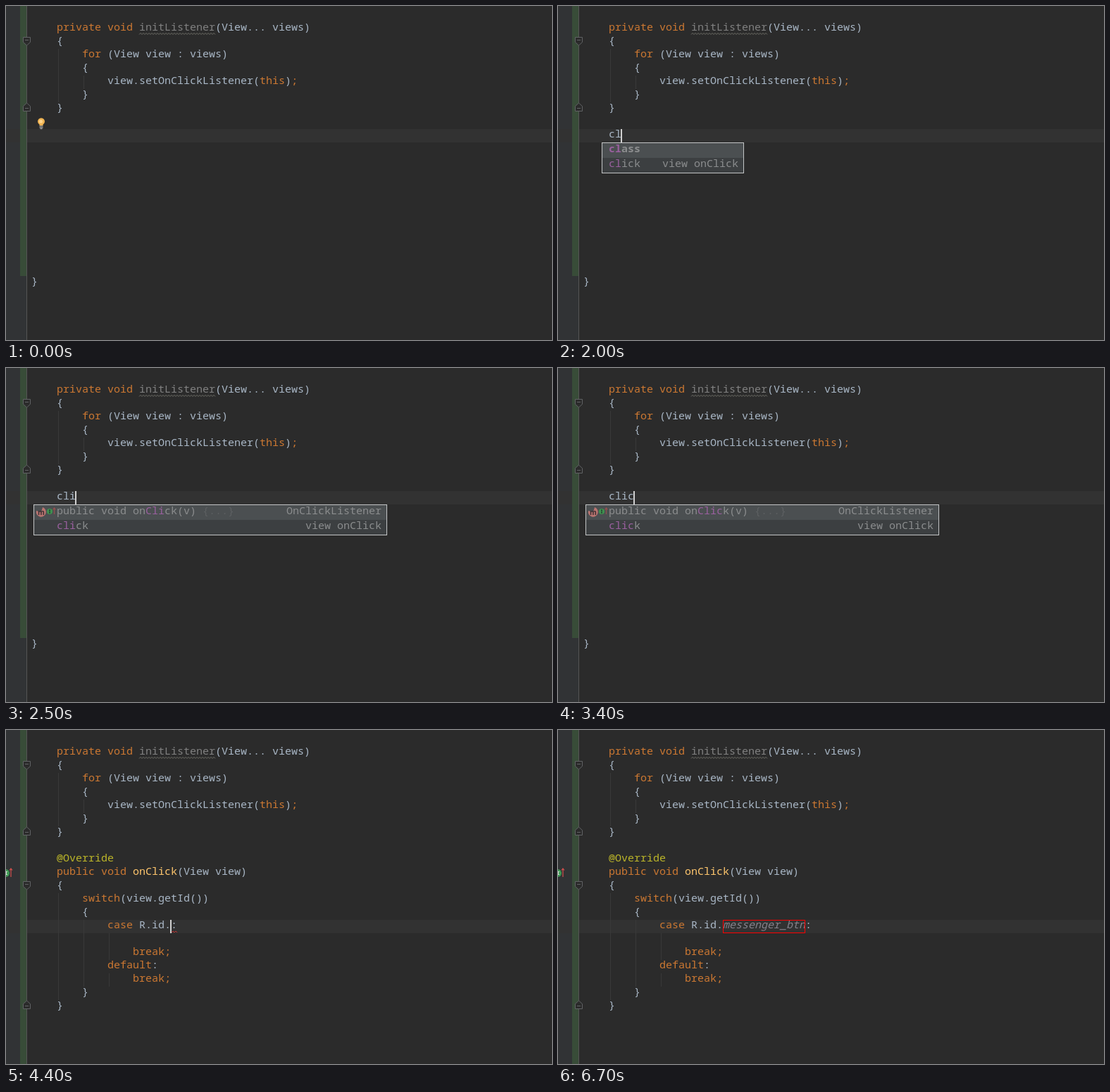
Animation of 775 by 475 pixels, one loop 6.8 s. Source, as an HTML page:

```html
<!DOCTYPE html>
<html lang="en">
<head>
<meta charset="utf-8">
<title>Live template in a code editor</title>
<style>
html, body { margin: 0; width: 100%; height: 100%; overflow: hidden; background: #2b2b2b; }
svg { display: block; }
text { font: 15px "Noto Sans Mono", "Liberation Mono", monospace; white-space: pre; fill: #a9b7c6; }
.key { fill: #cc7832; }
.note { fill: #bbb529; }
.name { fill: #ffc66d; }
.grey { fill: #808080; }
.bold { font-weight: bold; }
.field { fill: #85818a; font-style: italic; }
.guide { stroke: #393939; }
.fold { fill: #2b2b2b; stroke: #606264; }
.dim text { fill: #8b8d8e; }
.dim .hit { fill: #9a609f; }
.dim .tail { fill: #5d6062; }
.lit text { fill: #bbbbbb; }
.lit .hit { fill: #d583e3; }
.lit .tail { fill: #707375; }
.lit .icon, .dim .icon { font: bold 10px "Noto Sans", sans-serif; fill: #3c3033; text-anchor: middle; }
</style>
</head>
<body>
<svg id="stage" width="775" height="475" viewBox="0 0 775 475"></svg>
<script>
const LOOP = 6800, CHAR = 9, LINE = 19, ROW = 21;
const stage = document.getElementById("stage");

const lineTop = n => 23 + LINE * n;
const span = (cls, s) => `<tspan class="${cls}">${s}</tspan>`;
const key = s => span("key", s);
const rect = (x, y, w, h, fill, more = "") =>
  `<rect x="${x}" y="${y}" width="${w}" height="${h}" fill="${fill}" ${more}/>`;
const frame = (x, y, w, h, color) =>
  rect(x + .5, y + .5, w - 1, h - 1, "none", `stroke="${color}"`);
const path = (d, attrs) => `<path d="${d}" ${attrs}/>`;
const text = (x, y, s, attrs = "") => `<text x="${x}" y="${y}" ${attrs}>${s}</text>`;
const code = (line, column, s) => text(36 + CHAR * column, lineTop(line) + 12, s);

const wave = (x, y, width, color) => {
  let d = `M${x} ${y + 2}`;
  for (let i = 2; i <= width; i += 2) d += `L${x + i} ${y + (i % 4 ? 0 : 2)}`;
  return path(d, `fill="none" stroke="${color}" stroke-width=".9"`);
};

const guide = (x, from, to) =>
  path(`M${x + .5} ${lineTop(from)}V${lineTop(to)}`, 'class="guide"');

// A pentagon that points into the folded block
const fold = (line, dir) => {
  const y = lineTop(line) + 7.5;
  const start = dir > 0 ? y - 5 : y + 5;
  return path(`M24.5 ${start}h10v${7 * dir}l-5 ${4.5 * dir}l-5 ${-4.5 * dir}z` +
    `M27 ${y - (dir > 0 ? 1 : -1)}h5`, 'class="fold"');
};

const bulb = ([x, y]) => `<g transform="translate(${x} ${y})">
  <path d="M2.5 10V8.5A5 5 0 1 1 7.5 8.5V10z" fill="#f0b453"/>
  <circle cx="4.5" cy="4.2" r="2.5" fill="#ffd58c"/>
  <path d="M2.5 11h5M2.5 13h5M3.5 14.5h3" stroke="#8e8e8e" stroke-width="1.4"/></g>`;

const arrow = (x, y, h, color) =>
  path(`M${x} ${y + h}V${y}M${x - 2} ${y + 2.5}L${x} ${y}L${x + 2} ${y + 2.5}`,
    `fill="none" stroke="${color}" stroke-width="1.2"`);

// Icons: "o" overrides, "i" implements, "f" field
function icon(kind, y, lit) {
  const body = lit ? "#e08078" : "#b87470";
  if (kind === "f") {
    return `<circle cx="12" cy="${y}" r="7" fill="#b98a4a"/>` +
      text(12, y + 4, "f", 'class="icon"');
  }
  const shape = kind === "o"
    ? `<circle cx="11" cy="${y}" r="7" fill="${body}"/>`
    : path(`M4 ${y - 2}L11 ${y}L13 ${y - 7}A7 7 0 1 1 4 ${y - 2}z`, `fill="${body}"`);
  const badge = kind === "o" ? "#4589a6" : "#3f9150";
  return shape + text(11, y + 3.5, "m", 'class="icon"') +
    `<circle cx="23" cy="${y - 1}" r="4" fill="${badge}"/>` +
    (kind === "o"
      ? `<circle cx="23" cy="${y - 1}" r="1.6" fill="none" stroke="#2d3438"/>`
      : path(`M23 ${y - 3}v4M22 ${y - 3}h2M22 ${y + 1}h2`, 'stroke="#25352a" fill="none"')) +
    arrow(29.5, y - 6, 9, lit ? "#c75450" : "#98504e");
}

const markup = s => s
  .replace(/\[(.+?)\]/, (_, hit) => span("hit", hit))
  .replace(/\{.*$/, tail => span("tail", tail));

function popup({ x, y = 194, w, h, textX = 72, rows, selected = 0, lit, scroll }) {
  const inner = w - (scroll ? 15 : 2);
  const right = w - (scroll ? 22 : 8);
  let out = rect(0, 0, w, h, "#3c3f41") +
    rect(1, 1 + ROW * selected, inner, ROW, lit ? "#0052a4" : "#4b4f51");
  rows.forEach(([kind, label, origin, cls = ""], i) => {
    const base = 14 + ROW * i;
    if (kind) out += icon(kind, base - 3, lit);
    out += text(textX - x, base, markup(label), `class="${cls}"`);
    if (origin) out += text(right - CHAR * origin.length, base, origin);
  });
  if (scroll) {
    out += rect(w - 14, 1, 13, h - 2, "#3c3f41") + rect(w - 11, 1, 10, 183, "#595b5d") +
      text(w - 12, h - 3, "π", 'style="fill:#3d94c4"');
  }
  return `<svg class="${lit ? "lit" : "dim"}" x="${x}" y="${y}" width="${w}" height="${h}">` +
    out + frame(0, 0, w, h, "#c3c5c6") + "</svg>";
}

const click = hit => ["", `[${hit}]` + "click".slice(hit.length), "view onClick"];
const onClick = hit =>
  ["i", `public void on[${hit}]${"Click".slice(hit.length)}(v) {...}`, "OnClickListener"];
const classRow = ["", "[cl]ass", "", "bold"];
const wide = { x: 39, w: 502 };
const pair = hit => ({
  ...wide, h: 44, rows: [onClick("C" + hit.slice(1)), click(hit)]
});
const shortList = { x: 62, w: 202, h: 44, rows: [classRow, click("cl")] };
const fullList = {
  ...wide, h: 223, scroll: true,
  rows: [
    classRow,
    click("cl"),
    ["o", "protected Object [cl]one() {...}", "Object"],
    ["o", "public void [cl]oseContextMenu() {...}", "Activity"],
    ["o", "public void [cl]oseOptionsMenu() {...}", "Activity"],
    ["o", "public void [cl]earWallpaper() {...}", "ContextWrapper"],
    ["o", "public [Cl]assLoader getClassLoader…", "ContextWrapper"],
    ["o", "public String getLocal[Cl]assName() {...}", "Activity"],
    onClick("Cl"),
    ["o", "public void onContextMenu[Cl]osed(menu) {…", "Activity"],
    ["o", "public void onOptionsMenu[Cl]osed(menu) {…", "Activity"]
  ]
};
const fieldList = {
  x: 197, y: 289, w: 220, h: 23, textX: 234, rows: [["f", "[mes]senger_btn", "int"]]
};

const listener = () =>
  guide(74, 2, 6) + guide(110, 4, 5) +
  code(0, 4, key("private void ") + span("grey", "initListener") + "(View... views)") +
  wave(189, 38.5, 108, "#77776f") +
  code(1, 4, "{") +
  code(2, 8, key("for") + " (View view : views)") +
  code(3, 8, "{") +
  code(4, 12, `view.setOnClickListener(${key("this")})${key(";")}`) +
  code(5, 8, "}") + code(6, 4, "}") + fold(1, 1) + fold(6, -1);

function handler({ typed, guides, analyzed, resolved }) {
  const width = CHAR * typed.length;
  let out = guides
    ? guide(74, 11, 19) + guide(110, 13, 18) + guide(146, 14, 16) + guide(146, 17, 18) : "";
  out += code(8, 4, analyzed ? span("note", "@Override") : "@Override") +
    code(9, 4, key("public void ") + (analyzed ? span("name", "onClick") : "onClick") + "(View view)") +
    code(10, 4, "{") +
    code(11, 8, key("switch") + "(view.getId())") +
    code(12, 8, "{") +
    code(13, 12, key("case") + " R.id." + (resolved ? span("field", typed) : typed) + ":") +
    code(15, 16, key("break;")) +
    code(16, 12, key("default") + ":") +
    code(17, 16, key("break;")) +
    code(18, 8, "}") + code(19, 4, "}");
  if (typed) out += frame(234, 270, width, 19, "#ff0000");
  if (analyzed) {
    out += fold(10, 1) + fold(19, -1) +
      '<circle cx="-.5" cy="203.5" r="5.5" fill="#3f9a55"/>' +
      path("M0 201.5h2M0 205.5h2M.5 201v5", 'stroke="#d0e0d0" fill="none"') +
      arrow(7, 197, 12, "#d2504d");
    if (!typed) out += wave(235, 286, 8, "#d03030");
  }
  return out;
}

function scene(s) {
  const line = s.template ? 13 : 8;
  const caretX = (s.template ? 234 : 72) + CHAR * s.typed.length - 1;
  return rect(0, 0, 775, 475, "#2b2b2b") +
    rect(0, 0, 29, 475, "#313335") +
    rect(0, lineTop(line), 775, LINE, "#323232") +
    rect(20, 0, 9, s.template ? 475 : 384, "#384c38") +
    rect(29, 0, 1, 475, "#555555") +
    listener() +
    (s.template ? handler(s) : code(8, 4, s.typed) + code(19, 0, "}")) +
    (s.caret ? rect(caretX, lineTop(line), 2, LINE, "#d0d0d0") : "") +
    (s.list ? popup(s.list) : "") +
    (s.bulb ? bulb(s.bulb) : "");
}

// Each step changes only the listed parts of the state
const lineBulb = [45, 160];
const steps = [
  [0, { typed: "", caret: false, bulb: lineBulb }],
  [500, { caret: true, bulb: null }],
  [1300, { bulb: lineBulb }],
  [1400, { typed: "cl", bulb: null }],
  [1500, { typed: "cli" }],
  [1800, { list: pair("cli") }],
  [1900, { typed: "cl", list: null }],
  [2000, { list: shortList }],
  [2100, { list: fullList }],
  [2300, { caret: false }],
  [2500, { typed: "cli", caret: true, list: pair("cli") }],
  [2600, { typed: "clic", list: pair("clic") }],
  [3000, { caret: false }],
  [3400, { caret: true }],
  [3500, { list: { ...pair("clic"), selected: 1, lit: true } }],
  [3800, { bulb: [525, 219] }],
  [3900, { caret: false }],
  [4100, { template: true, typed: "", caret: true, list: null, bulb: null }],
  [4200, { guides: true }],
  [4400, { analyzed: true }],
  [5300, { typed: "m" }],
  [5400, { typed: "mes" }],
  [5500, { list: fieldList }],
  [5900, { typed: "messenger_btn", list: null }],
  [6000, { resolved: true }],
  [6700, { caret: false }]
];
let state = {};
const scenes = steps.map(([at, change]) => {
  state = { ...state, ...change };
  return { at, html: scene(state) };
});

const start = performance.now();
let shown = null;
function draw() {
  const t = (performance.now() - start) % LOOP;
  const current = scenes.filter(s => s.at <= t).pop();
  if (current !== shown) {
    stage.innerHTML = current.html;
    shown = current;
  }
  requestAnimationFrame(draw);
}
draw();
</script>
</body>
</html>
```
